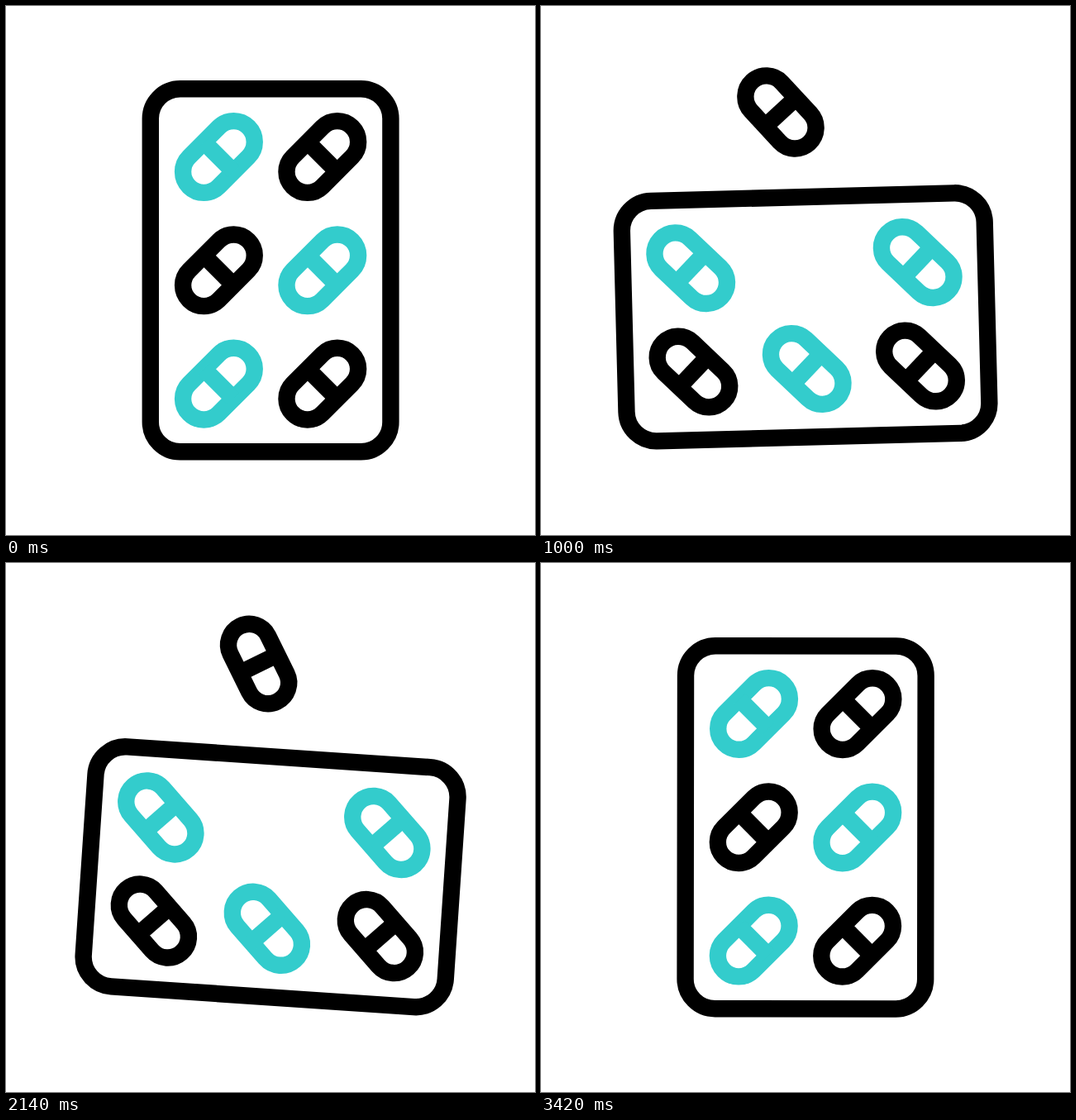
Recreate the animation shown at these times as an HTML page. Size 640 by 640 pixels, loop 3600 ms.

```html
<!DOCTYPE html>
<html lang="en">
<head>
<meta charset="utf-8">
<title>Blister pack</title>
<style>
  html, body { margin: 0; width: 100%; height: 100%; overflow: hidden; background: #fff; }
  svg { display: block; width: 100vw; height: 100vh; }
</style>
</head>
<body>
<svg viewBox="0 0 640 640" fill="none" stroke-width="20.4">
  <defs>
    <g id="pill">
      <rect x="-50.8" y="-25.3" width="101.6" height="50.6" rx="25.3" fill="#fff"/>
      <path d="M0-25.3V25.3"/>
    </g>
  </defs>
  <g id="pack" stroke="#000">
    <rect x="-145.3" y="-219.5" width="290.6" height="439" rx="36"/>
  </g>
  <g id="dots" fill="#33cccc"></g>
</svg>
<script>
const NS = 'http://www.w3.org/2000/svg';
const TEAL = '#33cccc', BLACK = '#000';
const LOOP = 3600, TURN = 102.4, DROP = 65.4, SPIN = 315 - TURN;
const COL = 62.7, ROW = 137.3;
const DOT_R = 13.4;

const pack = document.getElementById('pack');
const dotLayer = document.getElementById('dots');

function add(parent, tag, attrs) {
  const el = document.createElementNS(NS, tag);
  for (const key in attrs) el.setAttribute(key, attrs[key]);
  return parent.appendChild(el);
}

function addPill(x, y, stroke) {
  return add(pack, 'use', {
    href: '#pill', stroke, transform: `translate(${x} ${y}) rotate(-45)`
  });
}

addPill(-COL, -ROW, TEAL);
addPill(COL, -ROW, BLACK);
addPill(COL, 0, TEAL);
addPill(-COL, ROW, TEAL);
addPill(COL, ROW, BLACK);
const loose = addPill(-COL, 0, BLACK);

const dots = [[198.2, 51.5], [449.6, 66.5], [242.2, 136]]
  .map(([cx, cy]) => add(dotLayer, 'circle', { cx, cy, r: 0 }));

function cubic(a, b, c, d, s) {
  const u = 1 - s;
  return u * u * u * a + 3 * u * u * s * b + 3 * u * s * s * c + s * s * s * d;
}

// Eases from 0 to 1 between two times; x1 and x2 are the handle positions.
function ease(t, from, to, x1, x2) {
  const x = (t - from) / (to - from);
  if (x <= 0) return 0;
  if (x >= 1) return 1;
  let lo = 0, hi = 1;
  for (let i = 0; i < 30; i++) {
    const mid = (lo + hi) / 2;
    if (cubic(0, x1, x2, 1, mid) < x) lo = mid; else hi = mid;
  }
  return cubic(0, 0, 1, 1, (lo + hi) / 2);
}

function render(t) {
  const p = t < 1600
    ? ease(t, 0, 1600, 0.833, 0.167)
    : 1 - ease(t, 1600, 3500, 0.759, 0.0745);
  pack.setAttribute('transform',
    `translate(320.1 ${319.8 + DROP * p}) rotate(${TURN * p})`);

  const x = cubic(-COL, -136.4, -229.2, -266.7, p);
  const y = cubic(0, -15, -20, 47.2, p);
  loose.setAttribute('transform', `translate(${x} ${y}) rotate(${SPIN * p - 45})`);

  const grow = ease(t, 1100, 1600, 0.667, 0.333) - ease(t, 1600, 2100, 0.667, 0.333);
  for (const dot of dots) dot.setAttribute('r', DOT_R * grow);
}

const start = performance.now();
function tick() {
  render((performance.now() - start) % LOOP);
  requestAnimationFrame(tick);
}
render(0);
requestAnimationFrame(tick);
</script>
</body>
</html>
```
